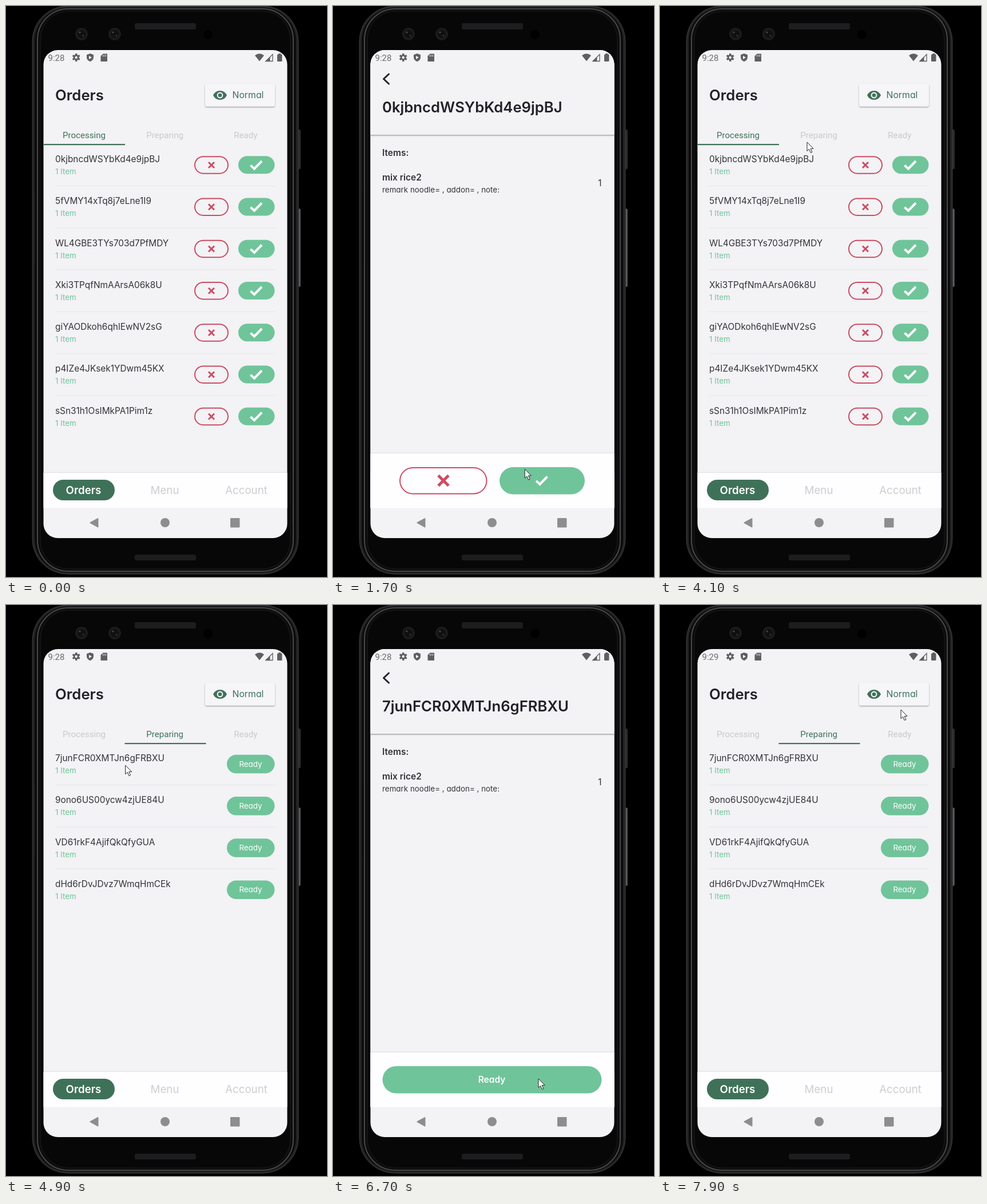
Animation of 561 by 998 pixels, one loop 8000 ms. Source, as an HTML page:

```html
<!DOCTYPE html>
<html lang="en">
<head>
<meta charset="utf-8">
<title>Orders app</title>
<style>
  html, body { margin: 0; width: 100%; height: 100%; overflow: hidden; background: #000; }
  svg { display: block; width: 100vw; height: 100vh; }
  text { font-family: Inter, "Open Sans", sans-serif; font-feature-settings: "cv11"; fill: #343338; }
  .bold { font-weight: 600; }
  .title { font-size: 25.7px; font-weight: 600; fill: #222127; }
  .id { font-size: 15.4px; }
  .count { font-size: 13.3px; fill: #70c49a; }
  .tab { font-family: Roboto, sans-serif; font-size: 15.1px; }
  .clock { font-family: Roboto, sans-serif; font-size: 15px; fill: #6b6a6d; }
  .nav { font-size: 18.7px; fill: #d0cecb; }
  .mid { text-anchor: middle; }
  .line { fill: none; stroke-linecap: round; stroke-linejoin: round; }
</style>
</head>
<body>
<svg id="stage" viewBox="0 0 561 998"></svg>
<script>
const GREEN = '#70c49a', DARK = '#3f7159', RED = '#cb4d63', PAPER = '#f3f2f5', LOOP = 8000, STEP = 100;

const rect = (x, y, w, h, r, fill, extra = '') =>
  `<rect x="${x}" y="${y}" width="${w}" height="${h}" rx="${r}" fill="${fill}" ${extra}/>`;
const text = (x, y, cls, str, extra = '') => `<text x="${x}" y="${y}" class="${cls}" ${extra}>${str}</text>`;
const line = (d, color, width) => `<path class="line" d="${d}" stroke="${color}" stroke-width="${width}"/>`;
const circle = (x, y, r, fill) => `<circle cx="${x}" cy="${y}" r="${r}" fill="${fill}"/>`;
const cross = (x, y, s, w) =>
  `<path d="M${x - s} ${y - s}l${2 * s} ${2 * s}m0 ${-2 * s}l${-2 * s} ${2 * s}" stroke="${RED}" stroke-width="${w}"/>`;
const check = (x, y, s, w) =>
  `<path d="M${x - s} ${y + .1 * s}l${.65 * s} ${.6 * s}l${1.3 * s} ${-1.35 * s}" fill="none" stroke="#fff" stroke-width="${w}"/>`;

function phone() {
  const lens = x => circle(x, 49, 11, '#1b1b1c') + circle(x, 49, 7, '#101011') +
    circle(x - 3, 46, 1.6, '#4a4a4c') + circle(x + 3, 52, 1.4, '#39393b');
  return rect(509, 216, 6, 69, 2, '#2c2c2e') + rect(509, 354, 6, 137, 2, '#39393b') +
    rect(512.5, 355, 1.5, 135, 0, '#6b6b6d') +
    rect(46, 0, 465, 993, 62, '#242426', 'stroke="#3d3d3f"') +
    rect(50, 3, 457, 987, 58, '#0c0c0d') +
    rect(55, 5, 447, 983, 54, '#0c0c0d', 'stroke="#48484a" stroke-width="2"') +
    rect(60, 9, 437, 975, 50, '#070708', 'stroke="#1c1c1e"') +
    rect(225, 30, 107, 11, 3, '#1d1d1f') + rect(225, 959, 107, 10, 3, '#1d1d1f') +
    lens(132) + lens(190) + circle(353, 50, 8, '#000') +
    rect(65.5, 77, 426, 853, 25, PAPER);
}

function statusBar() {
  const c = '#5f5e61';
  const teeth = [0, 60, 120].map(a => rect(121, 83, 3.4, 14, .6, c, `transform="rotate(${a} 122.7 90)"`)).join('');
  return text(73.5, 95.5, 'clock', '9:28', 'id="clock"') +
    teeth + circle(122.7, 90, 5, c) + circle(122.7, 90, 2.2, PAPER) +
    `<path d="M147 83l6 2.3v4.5q0 5-6 7.4q-6-2.400-6-7.400v-4.500z" fill="${c}"/>
     <path d="M145 87l5 3l-5 3z" fill="${PAPER}"/>
     <path d="M169.500 83.500h7.500v13.500h-11.500v-9.500z" fill="${c}"/>
     <path d="M169.500 85.500v3m2.500-3v3m2.500-3v3" stroke="${PAPER}"/>
     <path d="M435 86.500q8-6.500 16 0l-8 10z" fill="${c}"/>
     <path d="M454 96.500l12-12v12z" fill="none" stroke="${c}" stroke-width="1.300"/>
     <path d="M453.500 97l8-8v8z" fill="${c}"/>` +
    rect(474, 84.5, 8.500, 12.5, 1, c) + rect(476.3, 83, 4, 3, 0, c);
}

const systemBar = () => rect(66, 877.5, 425, 30, 0, PAPER) +
  `<path d="M147.500 903.200l13-7.200v14.500z" fill="#8d8c8f" stroke="#8d8c8f" stroke-width="2" stroke-linejoin="round"/>` +
  circle(278, 903, 8, '#8d8c8f') + rect(392, 895, 16.500, 16.500, 1, '#8d8c8f');

const rowActions = {
  processing: rect(330, 263.2, 58, 29.5, 14.7, 'none', `stroke="${RED}" stroke-width="2"`) +
    cross(359, 278, 5, 3) + rect(406, 262.3, 63.500, 31, 15.5, GREEN) + check(437.5, 277.5, 10, 4),
  preparing: rect(386, 261.7, 83.500, 32.5, 16.2, GREEN) +
    text(427.5, 282.700, 'mid', 'Ready', 'style="fill:#fff;font-size:13.4px"')
};

function list(kind, ids) {
  const rows = ids.map((id, i) => `<g transform="translate(0 ${(i * 73.25).toFixed(2)})">` +
    text(86, 273, 'id', id) + text(86, 294, 'count', '1 Item') + rowActions[kind] +
    (i < ids.length - 1 ? rect(86, 314, 384, 1, 0, '#e6e5e8') : '') + '</g>');
  return `<g id="${kind}">${rows.join('')}</g>`;
}

const home = () => text(86, 165, 'title', 'Orders') +
  rect(348, 136, 122, 39.5, 3, '#f6f5f8', 'filter="url(#raise)"') +
  `<path d="M362 156q4-8 12-8t12 8q-4 8-12 8t-12-8z" fill="${DARK}"/>` +
  circle(374, 156, 5.400, PAPER) + circle(374, 156, 3.300, DARK) +
  text(395.5, 161, '', 'Normal', `style="fill:${DARK};font-size:15.8px"`) +
  ['Processing', 'Preparing', 'Ready'].map((s, i) => text(136.5 + i * 141.200, 231, 'tab mid', s)).join('') +
  rect(66, 241, 142, 2.200, 0, DARK, 'id="marker"') +
  list('processing', ['0kjbncdWSYbKd4e9jpBJ', '5fVMY14xTq8j7eLne1I9', 'WL4GBE3TYs703d7PfMDY',
    'Xki3TPqfNmAArsA06k8U', 'giYAODkoh6qhlEwNV2sG', 'p4IZe4JKsek1YDwm45KX', 'sSn31h1OsIMkPA1Pim1z']) +
  list('preparing', ['7junFCR0XMTJn6gFRBXU', '9ono6US00ycw4zjUE84U', 'VD61rkF4AjifQkQfyGUA', 'dHd6rDvJDvz7WmqHmCEk']) +
  rect(65, 816, 427, 62, 0, '#fefdff', 'filter="url(#edge)"') + rect(82, 828, 108, 36, 18, DARK) +
  text(135.5, 852.7, 'nav mid bold', 'Orders', 'style="fill:#fff"') +
  text(277.5, 852.7, 'nav mid', 'Menu') + text(420, 852.7, 'nav mid', 'Account');

const detail = (name, id, buttons) => `<g id="${name}">` +
  rect(65, 77, 427, 900, 0, PAPER) + rect(60, 70, 437, 155, 0, PAPER, 'filter="url(#raise)"') +
  line('M97.500 119l-9 8.500l9 8.500', '#222127', 3) + text(86, 185.5, 'title', id) +
  text(86, 261.5, 'bold', 'Items:', 'font-size="15.5"') +
  text(86, 304.5, 'bold', 'mix rice2', 'font-size="15.5"') +
  text(86, 325.7, '', 'remark noodle= , addon= , note:', 'font-size="13.4"') +
  text(469.5, 314.7, '', '1', 'font-size="15.4" text-anchor="end"') +
  rect(60, 782, 437, 200, 0, '#fefdff', 'filter="url(#edge)"') + buttons + '</g>';

const choice = rect(117, 807, 151.500, 45.5, 22.7, 'none', `stroke="${RED}" stroke-width="2"`) +
  cross(193, 829.5, 9, 5) + rect(291, 806, 149, 47.5, 23.7, GREEN) + check(365, 829, 10, 4);
const readyButton = rect(86.5, 806, 383, 47.5, 23.7, GREEN) +
  text(277.5, 835, 'mid bold', 'Ready', 'style="fill:#fff;font-size:15.5px"');

document.getElementById('stage').innerHTML = `<defs>
  <clipPath id="page"><path d="M65.500 877.500V102a25 25 0 0 1 25-25h376a25 25 0 0 1 25 25v775.500z"/></clipPath>
  <filter id="raise" x="-10%" y="-20%" width="120%" height="150%"><feDropShadow dx="0" dy="1.500" stdDeviation="1.300" flood-opacity=".35"/></filter>
  <filter id="edge" x="-10%" y="-20%" width="120%" height="150%"><feDropShadow dx="0" dy="-.5" stdDeviation=".8" flood-opacity=".12"/></filter>
  </defs>` + phone() +
  `<g clip-path="url(#page)">${home()}${detail('first', '0kjbncdWSYbKd4e9jpBJ', choice)}${detail('second', '7junFCR0XMTJn6gFRBXU', readyButton)}</g>` +
  statusBar() + systemBar() +
  '<path id="cursor" d="M0 0v15.500l3.600-3.300l2.700 6.300l2.600-1.100l-2.700-6.100h4.900z" fill="#fff" stroke="#222" stroke-width="1"/>';

const $ = id => document.getElementById(id);
const tabs = [...document.querySelectorAll('.tab')];
const clamp = v => Math.max(0, Math.min(1, v));

function bezier(x1, y1, x2, y2) {
  const at = (a, b, s) => 3 * (1 - s) ** 2 * s * a + 3 * (1 - s) * s * s * b + s ** 3;
  return x => {
    let lo = 0, hi = 1;
    for (let i = 0; i < 24; i++) {
      const mid = (lo + hi) / 2;
      if (at(x1, x2, mid) < x) lo = mid; else hi = mid;
    }
    return at(y1, y2, lo);
  };
}
const fastOutSlowIn = bezier(.4, 0, .2, 1), easeIn = bezier(.42, 0, 1, 1);

// Pointer stops: time, x, y
const stops = [
  [200, 262, 40], [300, 260, 53], [650, 228, 267], [1050, 228, 267], [1500, 200, 812], [1850, 423, 808],
  [2050, 423, 808], [2550, 84, 117], [2800, 84, 117], [3100, 423, 835], [3400, 92, 122], [3500, 92, 120],
  [3600, 110, 52], [3700, 140, 45], [4050, 257, 238], [4500, 257, 238], [5000, 203, 285], [5700, 203, 285],
  [6300, 340, 835], [6500, 359, 846], [6650, 359, 828], [6800, 359, 828], [7250, 94, 126], [7400, 90, 121],
  [7550, 160, 56], [7850, 421, 183], [8000, 421, 183]
];

function pointer(t) {
  const i = Math.max(1, stops.findIndex(s => s[0] > t));
  const [t0, x0, y0] = stops[i - 1], [t1, x1, y1] = stops[i];
  const p = clamp((t - t0) / (t1 - t0)), k = p * p * (3 - 2 * p);
  return [x0 + (x1 - x0) * k, y0 + (y1 - y0) * k];
}

function showPage(id, t, open, close) {
  const p = clamp((t - open) / 300) - clamp((t - close) / 300);
  $(id).setAttribute('display', p > 0 ? 'inline' : 'none');
  $(id).setAttribute('opacity', easeIn(p));
  $(id).setAttribute('transform', `translate(0 ${200 * (1 - fastOutSlowIn(p))})`);
}

function render(t) {
  const slide = fastOutSlowIn(clamp((t - 4230) / 270));
  $('marker').setAttribute('x', 66 + 141.5 * slide);
  tabs.forEach((tab, i) => { tab.style.fill = i === (slide > .5 ? 1 : 0) ? DARK : '#cbc9c7'; });
  $('processing').setAttribute('display', t < 4600 ? 'inline' : 'none');
  $('preparing').setAttribute('display', t < 4600 ? 'none' : 'inline');
  showPage('first', t, 745, 3600);
  showPage('second', t, 5354, 7400);
  $('clock').textContent = t < 7600 ? '9:28' : '9:29';
  const [x, y] = pointer(t);
  $('cursor').setAttribute('transform', `translate(${x} ${y})`);
  $('cursor').setAttribute('display', t < 300 ? 'none' : 'inline');
}

const start = performance.now();
function tick() {
  const t = (performance.now() - start) % LOOP;
  render(Math.floor(t / STEP) * STEP);
  requestAnimationFrame(tick);
}
tick();
</script>
</body>
</html>
```
